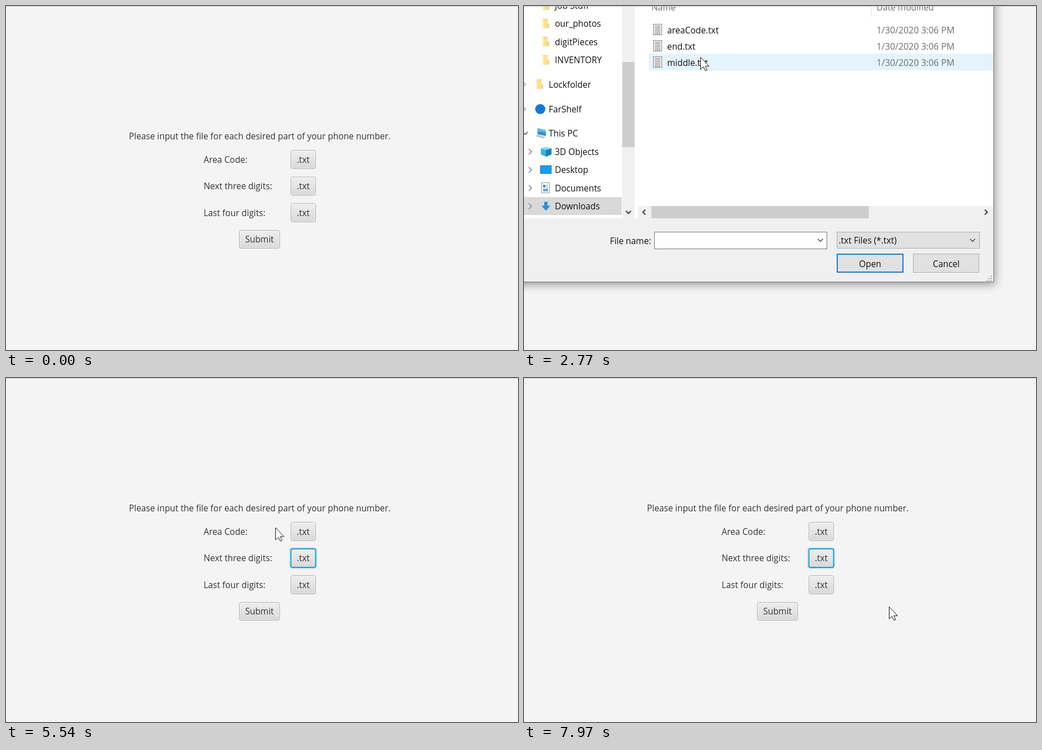
An HTML page for the animation above (8000 ms loop, 912 by 614 pixels).

```html
<!DOCTYPE html>
<html lang="en">
<head>
<meta charset="utf-8">
<title>File picker demo</title>
<style>
html, body { margin: 0; width: 100%; height: 100%; overflow: hidden; background: #f4f4f4; }
svg { display: block; width: 912px; height: 614px; }
text { font: 15.4px "Open Sans", "Noto Sans", sans-serif; fill: #111; }
.form { fill: #333; }
.mid { text-anchor: middle; }
.date { font-size: 15.9px; fill: #6d6d6d; }
.soft { fill: #6d6d6d; }
.group { fill: #1e3287; }
.line { fill: none; }
.frame { filter: drop-shadow(2px 4px 8px rgba(0, 0, 0, .4)); }

.step { animation: 8s step-end infinite; }
#dialog { animation-name: dialog; }
#loading { animation-name: loading; }
#glance { animation-name: glance; }
#chrome { animation-name: chrome; }
#list { animation-name: list; }
#row { animation-name: row; }
#folder { animation-name: folder; }
#hot { animation-name: hot; }
#pick1 { animation-name: pick1; }
#pick2 { animation-name: pick2; }
#ring1 { animation-name: ring1; }
#ring2 { animation-name: ring2; }
#click { animation-name: click; }
#pointer { animation: pointer 8s linear infinite; }

@keyframes dialog {
  0%, 51.25%, 95.5%, 100% { opacity: 0; }
  22.5%, 50.375%, 73.5%, 94.75% { opacity: .3; }
  23.3%, 49.5%, 74.3%, 93.875% { opacity: .6; }
  24.1%, 75.2% { opacity: .8; }
  25.1%, 76.1% { opacity: 1; }
}
@keyframes loading {
  0%, 60% { opacity: 1; }
  26%, 76.1%, 100% { opacity: 0; }
}
@keyframes glance {
  0% { opacity: 1; }
  50%, 100% { opacity: 0; }
}
@keyframes chrome {
  0%, 60% { opacity: 0; }
  26%, 76.1%, 100% { opacity: 1; }
}
@keyframes list {
  0%, 33.75%, 82%, 100% { opacity: 0; }
  26%, 76.1% { opacity: 1; }
}
@keyframes row {
  0%, 60% { fill: #fff; stroke: #fff; }
  29.5%, 78.5% { fill: #e5f3ff; stroke: #e5f3ff; }
  31%, 80%, 100% { fill: #cce8ff; stroke: #99d1ff; }
}
@keyframes folder {
  0%, 60% { opacity: 0; }
  33.75%, 82%, 100% { opacity: 1; }
}
@keyframes hot {
  0%, 60% { transform: translateY(58px); fill: #e5f3ff; stroke: #e5f3ff; }
  38.75% { transform: translateY(29px); fill: #e5f3ff; stroke: #e5f3ff; }
  43.75% { transform: none; fill: #e5f3ff; stroke: #e5f3ff; }
  45.75% { transform: none; fill: #cce8ff; stroke: #99d1ff; }
  90%, 100% { transform: translateY(58px); fill: #cce8ff; stroke: #99d1ff; }
}
@keyframes pick1 {
  0%, 60%, 100% { opacity: 0; }
  45.75% { opacity: 1; }
}
@keyframes pick2 {
  0% { opacity: 0; }
  90%, 100% { opacity: 1; }
}
@keyframes ring1 {
  0%, 22.5%, 63.75%, 100% { opacity: 0; }
  16.5%, 51% { opacity: 1; }
}
@keyframes ring2 {
  0%, 73.5% { opacity: 0; }
  63.75%, 95%, 100% { opacity: 1; }
}
@keyframes click {
  0%, 18.5%, 33%, 48%, 66.5%, 82%, 92.5%, 100% { opacity: 0; }
  16.5%, 31%, 45.6%, 63.75%, 79.9%, 89.75% { opacity: 1; }
}
@keyframes pointer {
  0%, 2% { transform: translate(766px, 640px); }
  2.75% { transform: translate(762px, 606px); }
  11.6%, 15.6% { transform: translate(542px, 300px); }
  16.5%, 19% { transform: translate(534px, 282px); }
  23.75%, 25.9% { transform: translate(108px, 135px); }
  30%, 33.1% { transform: translate(300px, 77px); }
  34.3%, 37.5% { transform: translate(314px, 91px); }
  41.25%, 43.25% { transform: translate(312px, 60px); }
  45%, 48.25% { transform: translate(308px, 44px); }
  52.5%, 53.9% { transform: translate(704px, 466px); }
  56.75%, 57.5% { transform: translate(604px, 398px); }
  59.5%, 61.5% { transform: translate(558px, 349px); }
  64%, 66.5% { transform: translate(540px, 322px); }
  76.1% { transform: translate(330px, 130px); }
  79.75%, 82.5% { transform: translate(300px, 76px); }
  84.5%, 86.75% { transform: translate(301px, 88px); }
  87.4%, 88.25% { transform: translate(306px, 86px); }
  89.4%, 96.6% { transform: translate(315px, 99px); }
  99.4%, 100% { transform: translate(650px, 408px); }
}
</style>
</head>
<body>
<svg id="stage" viewBox="0 0 912 614"></svg>
<script>
// Text and icons are placed by their vertical middle.
const text = (x, y, s, cls = '') => `<text x="${x}" y="${y + 5.5}" class="${cls}">${s}</text>`;
const rect = (x, y, w, h, fill, more = '') =>
  `<rect x="${x}" y="${y}" width="${w}" height="${h}" fill="${fill}" ${more}/>`;
const box = (x, y, w, h, fill, stroke, more = '') =>
  rect(x + .5, y + .5, w - 1, h - 1, fill, `stroke="${stroke}" ${more}`);
const path = (d, fill, more = '') => `<path d="${d}" fill="${fill}" ${more}/>`;
const group = (id, body) => `<g id="${id}" class="step">${body}</g>`;
const repeat = (n, fn) => Array.from({ length: n }, (_, i) => fn(i)).join('');

const turns = { down: 0, left: 90, right: -90 };
const chevron = (x, y, dir, color = '#444', size = 4.5, width = 1.4) =>
  `<path class="line" d="M${-size} ${-size / 2}L0 ${size / 2}L${size} ${-size / 2}" stroke="${color}"
    stroke-width="${width}" transform="translate(${x} ${y}) rotate(${turns[dir]})"/>`;

const icons = {
  folder: path('M-6-9h9v8l3 1v8h-12z', '#f6d67c') + path('M-6-9l3 2v16l-3-2z', '#ffeab0') +
    path('M-3-7h6v15h-6z', '#fbdf92'),
  star: path('M0-8l2.3 5.500 6 .4-4.600 3.900 1.500 5.800-5.200-3.200-5.200 3.200 1.500-5.800-4.600-3.900 6-.4z', '#3aa3ea'),
  disc: '<circle r="9" fill="#1478d4"/>',
  square: rect(-8, -9, 16, 18, '#2b2f6b'),
  desktop: box(-10, -8, 20, 15, '#12a0f8', '#0a6cc0'),
  arrow: path('M-3-8h6v7h5l-8 9-8-9h5z', '#2f8fe0'),
  page: box(-8, -10, 16, 20, '#f2f2f2', '#858585') +
    repeat(6, i => rect(-5, -7 + i * 2.8, 10, 1.2, '#8c8c8c')),
  doc: box(-8, -10, 15, 19, '#fff', '#8a9299') + rect(-5, -6, 4, 5, '#3a8ed0') +
    rect(0, -5, 4, 1, '#789') + rect(0, -2, 4, 1, '#789') + rect(-5, 1, 9, 5, '#69a9d6'),
  cube: path('M-9-6L0-9 10-6 0-3z', '#8bdcf2') + path('M-9-6L0-3V9L-9 5z', '#3db5dc') +
    path('M10-6L0-3V9L10 5z', '#1583bd'),
  pc: path('M-6-9L9-5V5L-6 2z', '#2e8fdc') + path('M-6-9L9-5V-1L-6-3z', '#5fb4ee') +
    path('M-10 5L-5 3 9 7 4 9z', '#b9c2c9'),
  card: path('M-8-10h13l3 3v17h-16z', '#174f86') + rect(-5, -7, 9, 3, '#5aa7dc') +
    rect(-5, 0, 10, 6, '#3180bd'),
  net: '<circle cx="3" cy="-2" r="7" fill="#58b4e4"/>' + path('M-10-5L2-2V7L-10 3z', '#2b80c4') +
    path('M-6 7L3 9 0 10z', '#aab4bc'),
  pin: path('M1-7L7-1 4 0 1 3 0 6-3 3-7 7-4 2-7-1-4-2-1-4z', '#9aa1a8')
};
const icon = (name, x, y) => `<g transform="translate(${x} ${y})">${icons[name]}</g>`;
const item = (name, x, y, label, gap = 16) => icon(name, x, y) + text(x + gap, y, label);

// Form
const button = (x, y, w, h, label) =>
  rect(x + .5, y + .5, w - 1, h - 1, 'url(#face)', 'rx="3.5" stroke="#b1b1b1"') +
  rect(x + 1.5, y + 1.5, w - 3, h - 3, 'none', 'rx="2.500" stroke="#fff" stroke-opacity=".35"') +
  text(x + w / 2, y + h / 2, label, 'form mid');
const ring = y => rect(505.5, y - 1.5, 48, 37, 'none', 'rx="5" stroke="#039ed3" stroke-opacity=".2" stroke-width="2"') +
  rect(507.5, y + .5, 44, 33, 'none', 'rx="3" stroke="#1a9bd0" stroke-width="2"');
const form =
  text(219, 232, 'Please input the file for each desired part of your phone number.', 'form') +
  ['Area Code:', 'Next three digits:', 'Last four digits:'].map((label, i) =>
    text(352, 274 + i * 47.6, label, 'form') + button(507, 257 + i * 47.5, 45, 34, '.txt')).join('') +
  button(415, 400, 73, 33, 'Submit') +
  group('ring1', ring(257)) + group('ring2', ring(304.5));

// Dialog while its contents load
const combo = (x, y, w) => box(x, y, w, 30, '#e1e1e1', '#adadad') +
  text(x + 3.500, y + 15.5, '.txt Files (*.txt)') + chevron(x + w - 13, y + 15, 'down');
const frame = (w, h) => box(-20, -20, w + 20, h + 20, '#f0f0f0', '#7d7d7d', 'class="frame"');
const loading = group('loading',
  frame(831, 490) + rect(0, 0, 819, 377, '#fff') + rect(202, 0, 1, 377, '#f0f0f0') +
  group('glance', rect(0, 134, 200, 32, '#dadada')) +
  [['star', 'Quick access'], ['folder', 'Lockfolder'], ['disc', 'FarShelf'],
   ['pc', 'This PC'], ['card', 'Disk Card (D:)'], ['net', 'Network']]
    .map(([name, label], i) => item(name, 33, 22 + i * 42.9, label, 15)).join('') +
  text(458, 16.5, 'Working on it...', 'soft') +
  rect(156, 404, 46, 23, '#fff') + rect(203, 404, 24, 23, '#fff') + rect(234, 401, 305, 30, '#fff') +
  combo(555, 401, 252) + rect(555, 438, 118, 35, '#fff') + rect(689, 438, 118, 35, '#fff') +
  rect(807, 466, 12, 22, '#fff'));

// Loaded dialog
const chrome = group('chrome',
  frame(837, 493) + rect(0, 0, 836, 379, '#fff') +
  rect(175, 0, 22, 379, '#f0f0f0') + chevron(186, 368, 'down', '#444', 4.5, 2.2) +
  rect(203, 357, 633, 22, '#f0f0f0') + rect(227, 357, 387, 22, '#cdcdcd') +
  chevron(214, 368, 'left', '#444', 4.5, 2.2) + chevron(823, 368, 'right', '#444', 4.5, 2.2) +
  text(227, 2, 'Name', 'soft') + text(628, 2, 'Date modified', 'soft') + rect(618, 0, 1, 19, '#e0e0e0') +
  text(153, 419, 'File name:') + box(232, 403, 308, 31, '#fff', '#7a7a7a') + chevron(528, 418, 'down') +
  combo(557, 403, 255) +
  rect(558, 443, 117, 32, '#e1e1e1', 'stroke="#1a78d2" stroke-width="2"') + text(616.5, 460, 'Open', 'mid') +
  box(693, 442, 118, 34, '#e1e1e1', '#adadad') + text(752, 460, 'Cancel', 'mid') +
  repeat(3, i => repeat(i + 1, j => rect(831 - j * 4, 481 + i * 4, 2.5, 2.5, '#b8b8b8'))));

const file = (name, y, label, date) =>
  icon(name, name === 'folder' ? 237 : 238, y - 1) + text(255, y, label) + text(628, y, date, 'date');
const heading = (y, label, dir, x) =>
  chevron(219.5, y - 1, dir, '#777', 5, 1.2) + text(232, y, label, 'group') + rect(x, y, 826 - x, 1, '#dcdcdc');

const places = [['desktop', 'Desktop'], ['arrow', 'Downloads'], ['doc', 'Documents'], ['folder', 'src'],
  ['folder', 'local'], ['folder', 'Web_Lesson'], ['folder', 'Job Stuff'], ['folder', 'our_photos'],
  ['folder', 'digitPieces'], ['folder', 'INVENTORY']];
const list = group('list',
  rect(0, 69, 174, 32, '#cce8ff') + rect(175, 5, 22, 152, '#cdcdcd') +
  chevron(2, 20, 'down') + item('star', 31, 20.5, 'Quick access', 13) +
  places.map(([name, label], i) => item(name, 39, 53 + i * 32.6, label) +
    (i < 6 ? icon('pin', 162, 53 + i * 32.6) : '')).join('') +
  heading(43, 'Today (1)', 'down', 307) +
  '<rect id="row" class="step" x="222.5" y="61.5" width="613" height="30"/>' +
  file('folder', 77.5, 'digitPieces', '1/30/2020 3:06 PM') +
  heading(112, 'Last week (4)', 'right', 335) +
  heading(149, 'A long time ago (5)', 'down', 383) +
  [['page', 'README.txt', '7/4/2017 8:30 PM'], ['square', 'website', '7/4/2017 8:30 PM'],
   ['folder', '.draft_checkpoints', '4/23/2019 10:34 AM'],
   ['folder', 'Sorting_Slideshow_v2_ger(1)', '2/27/2019 6:47 PM'],
   ['folder', 'Builder Kits', '2/16/2019 9:42 AM']]
    .map(([name, label, date], i) => file(name, 183.5 + i * 29, label, date)).join(''));

const folder = group('folder',
  rect(175, 100, 22, 152, '#cdcdcd') + rect(0, 341, 174, 32, '#d9d9d9') +
  places.slice(6).map(([name, label], i) => item(name, 39, -1 + i * 32.5, label)).join('') +
  chevron(1, 140, 'right', '#aaa') + item('folder', 28, 140, 'Lockfolder') +
  chevron(1, 184, 'right', '#aaa') + item('disc', 29, 184, 'FarShelf', 15) +
  chevron(2, 227, 'down') + item('pc', 30, 227, 'This PC', 14) +
  [['cube', '3D Objects'], ['desktop', 'Desktop'], ['doc', 'Documents'], ['arrow', 'Downloads']]
    .map(([name, label], i) => chevron(11, 260 + i * 32.5, 'right', '#999', 5, 1.8) +
      item(name, 39, 260 + i * 32.5, label)).join('') +
  '<rect id="hot" class="step" x="222.5" y="27.5" width="613" height="29"/>' +
  ['areaCode.txt', 'end.txt', 'middle.txt']
    .map((label, i) => file('page', 43 + i * 29, label, '1/30/2020 3:06 PM')).join('') +
  group('pick1', text(236, 419, 'areaCode.txt')) + group('pick2', text(236, 419, 'middle.txt')));

const pointer = `<g id="pointer">
  <circle id="click" class="step" r="16" fill="#f0e218" fill-opacity=".58"/>
  ${path('M.5.5V22L5.500 17.5 9 24.500 12 23.200 8.800 16.300H15.500z', '#fff', 'stroke="#111" stroke-linejoin="round"')}</g>`;

document.getElementById('stage').innerHTML = `
  <defs><linearGradient id="face" x2="0" y2="1">
    <stop stop-color="#efefef"/><stop offset="1" stop-color="#d8d8d8"/>
  </linearGradient></defs>
  ${rect(0, 0, 912, 614, '#f4f4f4')}${form}
  ${group('dialog', loading + chrome + list + folder)}
  ${rect(0, 0, 912, 1, '#c1c1c1')}${pointer}`;
</script>
</body>
</html>
```
